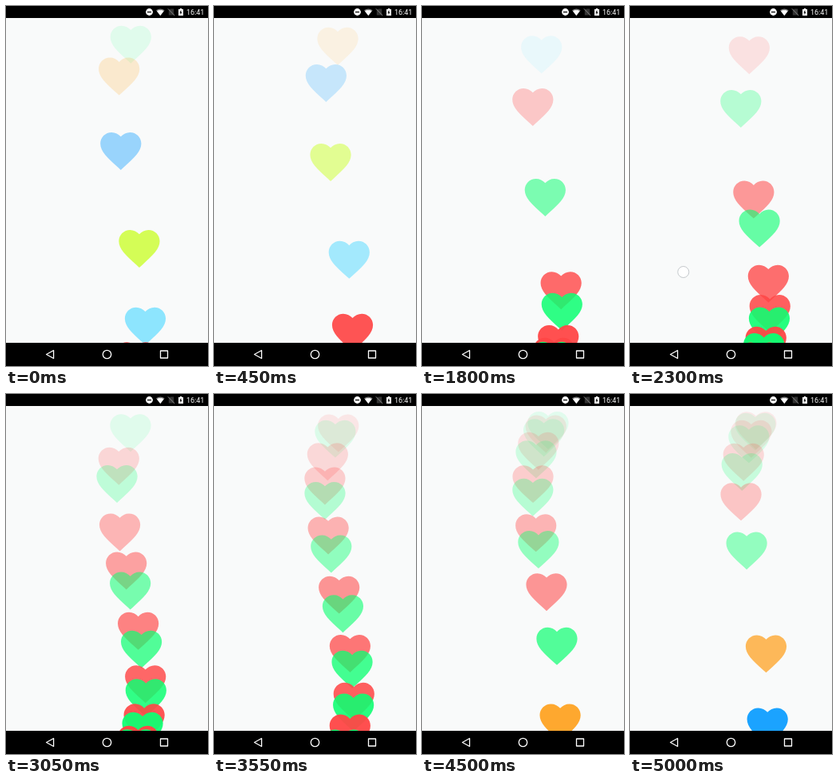
An HTML page with a canvas that plays this animation: 253x450 px, repeating every 5050 ms.

```html
<!DOCTYPE html>
<html lang="en">
<head>
<meta charset="utf-8">
<title>Floating hearts</title>
<style>
  html, body { margin: 0; width: 100%; height: 100%; overflow: hidden; background: #f9fafa; }
  canvas { display: block; width: 253px; height: 450px; }
</style>
</head>
<body>
<canvas id="stage"></canvas>
<script>
const W = 253, H = 450, BAR_TOP = 15, BAR_BOTTOM = 421;
const LOOP = 5050, STEP = 50, LIFE = 2950;
const canvas = document.getElementById('stage');
const ctx = canvas.getContext('2d');
const ratio = window.devicePixelRatio || 1;
canvas.width = W * ratio;
canvas.height = H * ratio;

const RED = 'rgb(255,70,70)', GREEN = 'rgb(14,255,114)', ORANGE = 'rgb(255,161,29)',
      BLUE = 'rgb(10,157,255)', LIME = 'rgb(195,255,10)', CYAN = 'rgb(129,227,255)';

// Hearts released at a steady rhythm, one per colour
const stream = (start, gap, colors) =>
  colors.map((color, i) => ({ birth: start + gap * i, color }));
const repeat = (color, n) => Array(n).fill(color);

const TAP_START = 1470, TAP_GAP = 312;
const hearts = [
  ...stream(-2770, 511, [GREEN, ORANGE, BLUE, LIME, CYAN, RED, GREEN, RED]),
  ...stream(TAP_START, TAP_GAP, repeat(RED, 6)),
  ...stream(955, 309, [GREEN, RED, ...repeat(GREEN, 5)]),
  ...stream(3315, 543, [GREEN, ORANGE, BLUE])
].sort((a, b) => a.birth - b.birth);

// Flight path: top centre of a heart along one cubic curve
const START = [161, 424], BEND_A = [215, 327.5], BEND_B = [94, 118.5], END = [158, 22];

const heartPath = new Path2D('M12 21.35l-1.45-1.32C5.4 15.36 2 12.28 2 8.5 2 5.42 4.42 3 7.5 3' +
  'c1.74 0 3.41.81 4.5 2.09C13.09 3.81 14.76 3 16.5 3 19.58 3 22 5.42 22 8.5' +
  'c0 3.78-3.4 6.86-8.55 11.54L12 21.35z');
const HEART_SCALE = 2.56;

const easeInOut = u => (1 - Math.cos(Math.PI * u)) / 2;

function flight(s, axis) {
  const r = 1 - s;
  return r * r * r * START[axis] + 3 * r * r * s * BEND_A[axis] +
    3 * r * s * s * BEND_B[axis] + s * s * s * END[axis];
}

function drawHeart(age, color) {
  if (age < 0 || age > LIFE) return;
  const s = easeInOut(age / LIFE);
  const x = flight(s, 0), y = flight(s, 1);
  const risen = (START[1] - y) / (START[1] - END[1]);
  ctx.save();
  ctx.globalAlpha = 1 - 0.9 * risen;
  ctx.fillStyle = color;
  ctx.translate(x, y);
  ctx.scale(HEART_SCALE, HEART_SCALE);
  ctx.translate(-12, -3);
  ctx.fill(heartPath);
  ctx.restore();
}

function disc(x, y, r) {
  ctx.beginPath();
  ctx.arc(x, y, r, 0, 2 * Math.PI);
}

function polygon(...points) {
  ctx.beginPath();
  points.forEach(([x, y]) => ctx.lineTo(x, y));
  ctx.closePath();
}

// The finger drifts slowly and shows for part of each tap
function drawTouch(t) {
  const phase = (t - TAP_START + TAP_GAP) % TAP_GAP;
  if (t < 1240 || t > 2800 || phase < 90 || phase > 210) return;
  const f = (t - 1250) / 1050;
  disc(72.3 - 5.5 * f, 328.3 + 4.2 * f, 7);
  ctx.fillStyle = '#fff';
  ctx.fill();
  ctx.strokeStyle = '#c4c8cb';
  ctx.lineWidth = 1;
  ctx.stroke();
}

function drawStatusBar() {
  ctx.fillStyle = '#000';
  ctx.fillRect(0, 0, W, BAR_TOP);
  // Do not disturb
  ctx.fillStyle = '#fff';
  disc(179.5, 7.5, 4.4);
  ctx.fill();
  ctx.fillStyle = '#000';
  ctx.fillRect(177, 6.9, 5, 1.3);
  // Signal
  ctx.beginPath();
  ctx.moveTo(193.3, 12);
  ctx.lineTo(188, 5.2);
  ctx.quadraticCurveTo(193.3, 1.6, 198.6, 5.2);
  ctx.closePath();
  ctx.fillStyle = '#777';
  ctx.fill();
  polygon([193.3, 12], [189, 6.5], [191, 5.3], [195.6, 5.3], [197.6, 6.5]);
  ctx.fillStyle = '#fff';
  ctx.fill();
  // No SIM
  polygon([203.8, 5.6], [206, 3.5], [210.2, 3.5], [210.2, 11.5], [203.8, 11.5]);
  ctx.fillStyle = '#333';
  ctx.fill();
  polygon([203, 3.5], [211, 11.8]);
  ctx.strokeStyle = '#777';
  ctx.lineWidth = 0.8;
  ctx.stroke();
  // Battery
  ctx.fillStyle = '#fff';
  ctx.fillRect(216, 4, 6, 8);
  ctx.fillRect(217.8, 3, 2.4, 1);
  ctx.fillStyle = '#000';
  polygon([219.3, 5], [217.3, 8.5], [218.6, 8.5], [218.4, 11], [220.5, 7.4], [219.2, 7.4]);
  ctx.fill();
  ctx.fillStyle = '#fff';
  ctx.font = '9px Roboto, sans-serif';
  ctx.textAlign = 'right';
  ctx.fillText('16:41', 248.3, 11);
}

function drawNavBar() {
  ctx.fillStyle = '#000';
  ctx.fillRect(0, BAR_BOTTOM, W, H - BAR_BOTTOM);
  ctx.strokeStyle = '#fff';
  ctx.lineWidth = 1.3;
  ctx.lineJoin = 'round';
  polygon([50.6, 435.5], [59.6, 430.5], [59.6, 440.5]);
  ctx.stroke();
  disc(126.5, 435.5, 5.2);
  ctx.stroke();
  ctx.strokeRect(193.5, 431, 9, 9);
}

function draw(t) {
  ctx.setTransform(ratio, 0, 0, ratio, 0, 0);
  ctx.fillStyle = '#f9fafa';
  ctx.fillRect(0, 0, W, H);
  hearts.forEach(({ birth, color }) => drawHeart(t - birth, color));
  drawTouch(t);
  drawStatusBar();
  drawNavBar();
}

const begin = performance.now();
function tick() {
  const t = (performance.now() - begin) % LOOP;
  draw(Math.floor(t / STEP) * STEP);
  requestAnimationFrame(tick);
}
tick();
</script>
</body>
</html>
```
